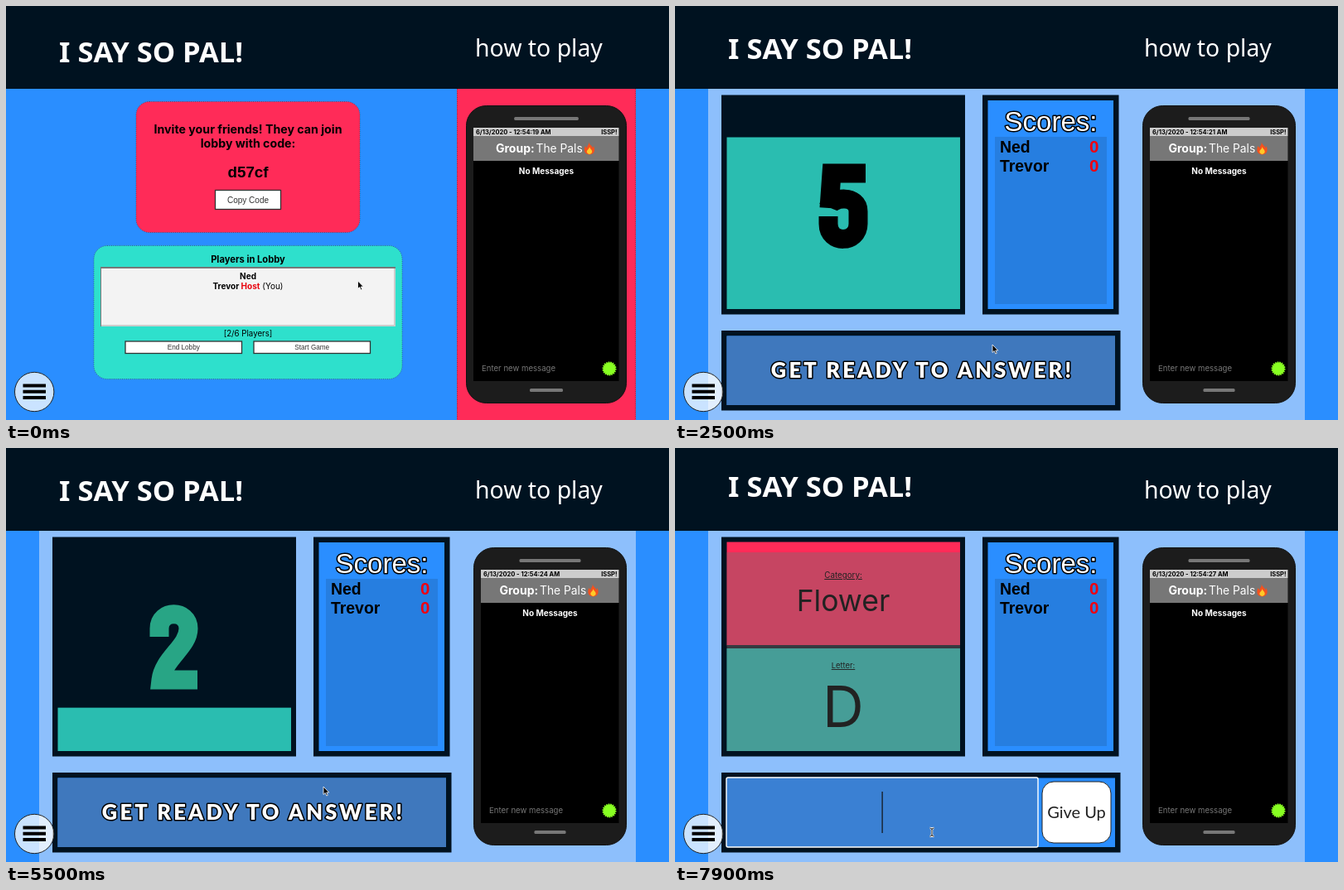
Write an HTML page that moves like this. It is 800 px wide and 500 px high and loops after 8000 ms.

```html
<!DOCTYPE html>
<html lang="en">
<head>
<meta charset="utf-8">
<style>
  html, body { margin: 0; width: 100%; height: 100%; overflow: hidden; }
  svg { display: block; width: 800px; height: 500px; background: #2a8eff; }
  text { font-family: Inter, sans-serif; white-space: pre; }
  .arial { font-family: "Liberation Sans", Arial, sans-serif; }
  .noto { font-family: "Noto Sans", sans-serif; }
  .lato { font-family: Lato, sans-serif; }
  .b { font-weight: 700; }
  .m { text-anchor: middle; }
  .e { text-anchor: end; }
  .outline { stroke: #000; stroke-width: 3px; paint-order: stroke; stroke-linejoin: round; }
  .digit { fill: none; stroke-width: 23px; }
  .dots { stroke: #333; stroke-opacity: .55; stroke-dasharray: 1 1.5; }
</style>
</head>
<body>
<svg id="stage" viewBox="0 0 800 500"></svg>
<script>
const LOOP = 8000, GAME = 1500, COUNT = 1630, LOADING = 6530, ROUND = 7000;
const DARK = '#001220', PINK = '#ff2b58', TEAL = '#2abdb0', BLUE = '#2a8eff';
const DIGITS = {
  1: 'M38 101V0M8 24Q30 22 34 0',
  2: 'M12 38V28C12 5 47 5 47 28C47 50 17 64 14 90H58',
  3: 'M12 34V28C12 5 47 5 47 28C47 43 41 48 26 48C41 48 48 52 48 66V74C48 97 12 98 12 74V64',
  4: 'M41 101V0M34 4L11 72H62',
  5: 'M57 12H16L13 54M12 53C17 40 48 38 48 58V73C48 97 12 98 12 73V64'
};

const rect = (x, y, w, h, fill, more = '') =>
  `<rect x="${x}" y="${y}" width="${w}" height="${h}" fill="${fill}" ${more}/>`;
const text = (x, y, size, fill, cls, str, more = '') =>
  `<text x="${x}" y="${y}" font-size="${size}" fill="${fill}" class="${cls}" ${more}>${str}</text>`;
const frame = (x, y, w, h, fill) =>
  rect(x + 3.25, y + 3.25, w - 6.5, h - 6.5, fill, `stroke="${DARK}" stroke-width="6.5"`);
const button = (x, y, w, h, label, size, id = '') =>
  `<g ${id}>${rect(x, y, w, h, '#fff', 'stroke="#333" stroke-width="1.3"')}` +
  text(x + w / 2, y + h / 2 + size * .35, size, '#333', 'arial m', label) + '</g>';

function phone(x) {
  const w = 749 - x, c = x + w / 2, left = x + 9, sw = w - 18.5;
  return rect(x + .5, 120.5, w - 1, 359, '#1c1c1c', 'rx="24" stroke="#111"') +
    rect(c - w * .2, 134, w * .4, 4, '#777', 'rx="1.5"') +
    rect(c - w * .103, 462, w * .206, 4, '#777', 'rx="1.5"') +
    rect(left, 147, sw, 306, '#000') +
    rect(left, 147, sw, 10, '#ccc') + rect(left, 157, sw, 30, '#777') +
    text(left + 3, 154.8, 7.5, '#000', 'b clock', '') +
    text(left + sw - 2, 154.8, 7.5, '#000', 'b e', 'ISSP!') +
    text(c - 61, 177, 14, '#fff', 'b', 'Group:') +
    text(c - 12.5, 177, 13.8, '#fff', '', 'The Pals') +
    `<g transform="translate(${c + 45} 164)">
      <path d="M6 0C7 4 11 5 11 8L12 5C14 9 14 15 7 15.5C0 15 0 9 2 5L4 8C4 4 7 4 6 0" fill="#f4511e"/>
      <path d="M7 6C8 9 11 10 10 13Q7 17 4 13C3 10 7 9 7 6" fill="#ffca28"/></g>` +
    text(c, 202.5, 10, '#fff', 'b m', 'No Messages') +
    text(left + 10, 440.5, 9.6, '#777', '', 'Enter new message') +
    `<circle cx="${left + sw - 11.5}" cy="438" r="7.5" fill="#8f2" stroke="#8f2" stroke-width="2" stroke-dasharray="1.6 1"/>`;
}

const lobby = () =>
  rect(544, 100, 216, 400, PINK) +
  '<path d="M544.5 100V500M759.5 100V500" class="dots"/>' +
  rect(157, 115.5, 270, 158, PINK, 'rx="16" class="dots"') +
  text(292, 153.5, 14.2, '#000', 'b m', 'Invite your friends! They can join') +
  text(292, 171, 14.2, '#000', 'b m', 'lobby with code:') +
  text(292, 207, 18.8, '#000', 'arial b m', 'd57cf') +
  button(252.5, 222.5, 79, 23, 'Copy Code', 10) +
  rect(106, 289.5, 372, 161, '#2ee0cc', 'rx="16" class="dots"') +
  text(292, 310, 11.2, '#000', 'b m', 'Players in Lobby') +
  rect(114, 315, 356, 72, '#777') + rect(115, 317, 355, 70, '#ccc') + rect(115, 317, 353, 68, '#f3f3f3') +
  text(292, 330, 10, '#000', 'b m', 'Ned') +
  text(292, 341.5, 10, '#000', 'm', '<tspan class="b">Trevor <tspan fill="#e8000c">Host</tspan></tspan> (You)') +
  text(292, 399, 9.7, '#000', 'm', '[2/6 Players]') +
  button(144, 405, 140.5, 14.5, 'End Lobby', 8.2) +
  button(299, 405, 140.5, 14.5, 'Start Game', 8.2, 'id="start"') +
  phone(555);

const score = (y, name) =>
  text(392, y, 19.4, '#000', 'arial b', name) + text(511.5, y, 20.5, '#f00010', 'arial b e', '0');

const game = () =>
  rect(40, 100, 720, 400, '#8dbffc') +
  frame(56, 107.5, 294, 265, DARK) +
  `<g id="count"><path class="digit" stroke="#28a585" transform="translate(173 190)"/>
    ${rect(62.5, 113, 281.5, 253, TEAL, 'id="fill"')}
    <clipPath id="below">${rect(62, 113, 282, 253, '#000', 'id="cut"')}</clipPath>
    <g clip-path="url(#below)"><path class="digit" stroke="#000" transform="translate(173 190)"/></g></g>
  <g id="loading">${rect(62.5, 113.5, 281.5, 252.5, TEAL)}
    ${text(204, 249, 26.5, '#000', 'lato m', 'Loading Round...', 'font-weight="900" letter-spacing="1.4"')}</g>
  <g id="question">${rect(62.5, 113.5, 281.5, 125, PINK) + rect(62.5, 242, 281.5, 124, TEAL)}
    ${rect(62.5, 238, 281.5, 4, '#101820')}
    ${rect(62.5, 126, 281.5, 240, '#706c70', 'fill-opacity=".4" id="timer"')}
    ${text(203, 157, 9.8, '#222', 'm', 'Category:', 'text-decoration="underline"')}
    ${text(203, 196.5, 35.5, '#222', 'm', 'Flower')}
    ${text(203, 266, 9.4, '#222', 'm', 'Letter:', 'text-decoration="underline"')}
    ${text(203, 336.5, 69, '#222', 'm', 'D')}</g>` +
  frame(371, 107.5, 164.5, 265, BLUE) +
  rect(386, 158, 135, 202, '#267ee0') +
  text(453.5, 151, 33, '#fff', 'arial m outline', 'Scores:') +
  score(177, 'Ned') + score(200, 'Trevor') +
  frame(56, 392, 481.5, 96.5, BLUE) +
  `<g id="ready">${rect(62.5, 398.5, 468.5, 83.5, '#3f78bd')}
    ${text(298.5, 448.5, 25.5, '#fff', 'lato m outline', 'GET READY TO ANSWER!', 'font-weight="900" letter-spacing="3.2"')}</g>
  <g id="answer">${rect(62, 398, 376, 84, '#3a80d3', 'rx="2" stroke="#fff" stroke-width="1.4"')}
    ${rect(249.5, 415, 1.2, 50, '#111', 'id="caret"')}
    ${rect(443, 403, 83, 74, '#fff', 'rx="14" stroke="#222"')}
    ${text(484.5, 447, 20, '#222', 'lato m', 'Give Up')}</g>` +
  phone(564);

const BEAM = 'M-2.5 -5Q0 -5 0 -3V3Q0 5 2.5 5M2.5 -5Q0 -5 0 -3M0 3Q0 5 -2.5 5';
const stage = document.getElementById('stage');
stage.innerHTML =
  `<g id="lobby">${lobby()}</g><g id="game">${game()}</g>` +
  rect(0, 0, 800, 100, DARK) +
  text(64, 0, 34.5, '#fff', 'noto b', 'I SAY SO PAL!', 'id="title"') +
  text(566, 61, 28.4, '#fff', 'noto', 'how to play') +
  `<circle cx="34.2" cy="466" r="23.7" fill="#fff" fill-opacity=".75" stroke="#222"/>
  <path d="M20.5 458.5H48M20.5 465.7H48M20.5 473H48" stroke="#000" stroke-width="4"/>
  <g id="pointer">
    <path id="arrow" d="M0 0V9.5L2.2 7.5L3.8 11L5.3 10.3L3.8 7H6.8Z" fill="#000" stroke="#fff" stroke-width=".8"/>
    <g id="beam" fill="none"><path d="${BEAM}" stroke="#fff" stroke-width="2.4"/><path d="${BEAM}" stroke="#222"/></g>
  </g>`;

const $ = id => document.getElementById(id);
const set = (el, attrs) => { for (const k in attrs) el.setAttribute(k, attrs[k]); };
const show = (id, on) => set($(id), { display: on ? 'inline' : 'none' });
const clocks = document.querySelectorAll('.clock');
const digits = document.querySelectorAll('.digit');
const ease = (t, from, to) => {
  const p = Math.min(1, Math.max(0, (t - from) / (to - from)));
  return p * p * (3 - 2 * p);
};

function draw(t) {
  show('lobby', t < GAME);
  show('game', t >= GAME);
  show('count', t < LOADING);
  show('loading', t >= LOADING && t < ROUND);
  show('question', t >= ROUND);
  show('ready', t < ROUND);
  show('answer', t >= ROUND);

  // The heading floats up and down every three seconds.
  set($('title'), { y: 62.8 + 5.2 * Math.cos((t - 100) / 3000 * 2 * Math.PI) });
  const second = 19 + Math.floor((t + 300) / 1000);
  clocks.forEach(c => c.textContent = `6/13/2020 - 12:54:${second} AM`);

  const left = Math.min(5, Math.max(1, Math.ceil(5 - (t - COUNT) / 1000)));
  digits.forEach(d => set(d, { d: DIGITS[left] }));
  const top = Math.min(366, Math.max(113, 113.5 + (t - COUNT) * .0517));
  for (const id of ['fill', 'cut']) set($(id), { y: top, height: 366 - top });

  const line = 113 + Math.max(0, t - ROUND) * .0144;
  set($('timer'), { y: line, height: 366 - line });
  show('caret', (t + 200) % 1000 < 500);

  const down = ease(t, 350, 1150), away = ease(t, 7150, 7750);
  const x = 424.5 - 41.5 * down - 73 * away, y = 332 + 77 * down + 55 * away;
  set($('pointer'), { transform: `translate(${x} ${y})` });
  show('arrow', t < LOADING);
  show('beam', t >= LOADING);

  const hover = y > 405;
  const [box, label] = $('start').children;
  set(box, { fill: hover ? '#3338e4' : '#fff', stroke: hover ? '#3338e4' : '#333' });
  set(label, { fill: hover ? '#fff' : '#333' });
}

function tick() {
  draw(performance.now() % LOOP);
  requestAnimationFrame(tick);
}
tick();
</script>
</body>
</html>
```
